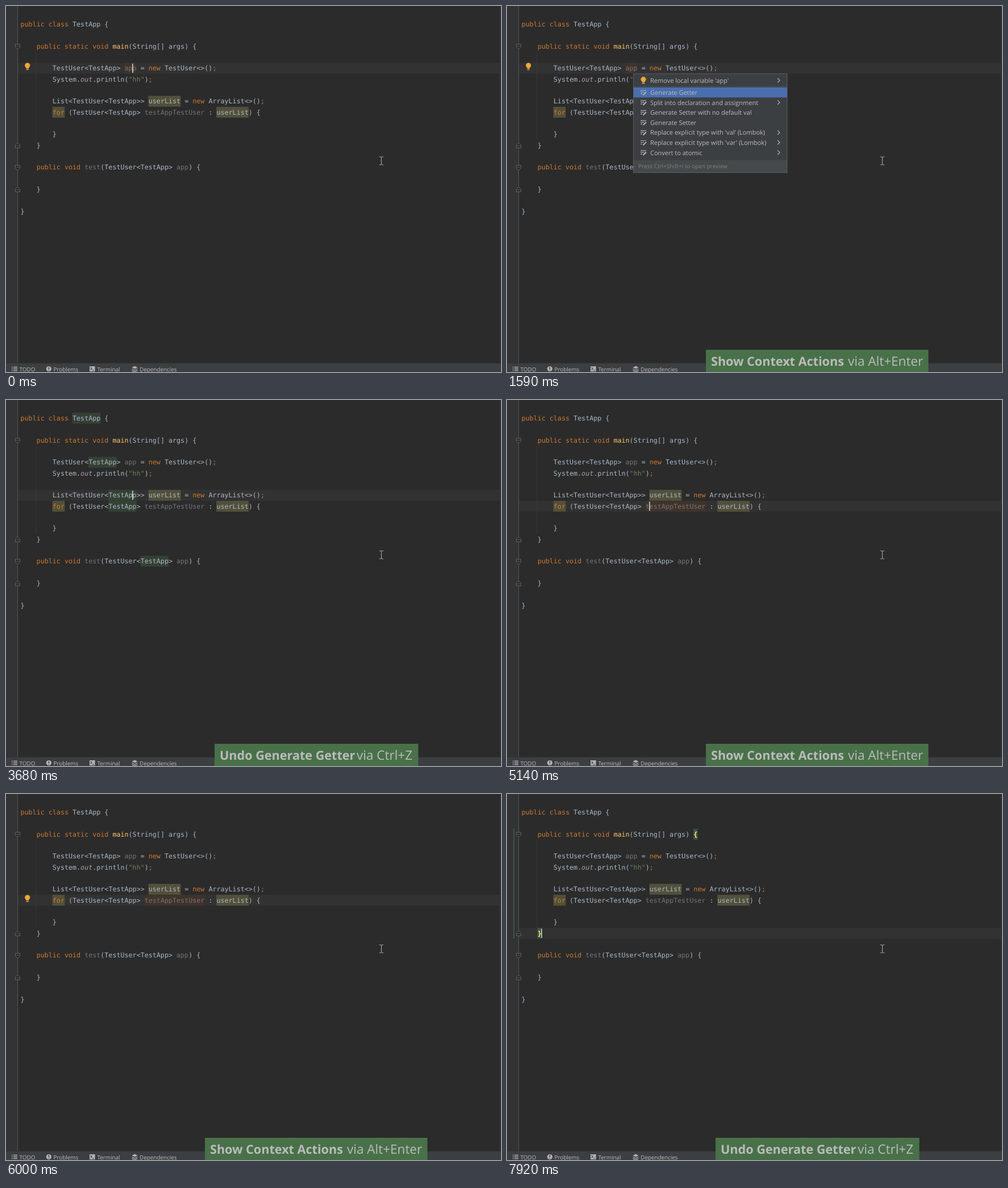
An HTML page for the animation above (8000 ms loop, 871x643 px).

```html
<!DOCTYPE html>
<html lang="en">
<head>
<meta charset="utf-8">
<title>Generate Getter</title>
<style>
html, body { margin: 0; width: 100%; height: 100%; overflow: hidden; background: #2b2b2b; }
svg { display: block; width: 871px; height: 643px; }
text { white-space: pre; text-rendering: geometricPrecision; font-family: "Open Sans", "Noto Sans", sans-serif; fill: #bbb; }
.code text { font: 11.7px "DejaVu Sans Mono", "Noto Sans Mono", monospace; font-variant-ligatures: none; fill: #a9b7c6; }
.code .kw { fill: #cc7832; }
.code .fn { fill: #ffc66d; }
.code .str { fill: #6a7f60; }
.code .it { font-style: italic; fill: #a99cae; }
.code .dim { fill: #72737a; }
.code .brace { fill: #ffef28; font-weight: 700; }
.fold { fill: #2b2b2b; stroke: #64676a; }
.menu text { font-size: 11px; }
.menu .hint { font-size: 10px; fill: #7d8083; }
.status text { font-size: 9.9px; }
.banner text { font-size: 22.5px; }
.banner .b { font-size: 21.6px; font-weight: 700; }
</style>
</head>
<body>
<svg viewBox="0 0 871 643">
  <rect width="871" height="643" fill="#2b2b2b"/>
  <g id="view"></g>
  <g class="status">
    <rect y="627" width="871" height="1" fill="#323232"/>
    <rect y="628" width="871" height="15" fill="#3c3f41"/>
    <path d="M10 634.5h1.5m1.5 0h7M10 637.5h1.5m1.5 0h7M10 640.5h1.5m1.5 0h7" stroke="#afb1b3" stroke-width="1.3"/>
    <circle cx="75.3" cy="637.5" r="4.6" fill="#afb1b3"/>
    <path d="M75.3 634.5v3.6m0 1.1v1.4" stroke="#3c3f41" stroke-width="1.4"/>
    <rect x="147" y="633" width="9.6" height="9" fill="#afb1b3"/>
    <path d="M148.8 635l2.2 2.2-2.2 2.2M152 640h3" fill="none" stroke="#3c3f41" stroke-width="1.2"/>
    <path d="M226.5 632.5l5 2.5-5 2.5-5-2.5z" fill="#afb1b3"/>
    <path d="M221.5 637.5l5 2.5 5-2.5M221.5 640.3l5 2.5 5-2.5" fill="none" stroke="#afb1b3" stroke-width="1.3"/>
    <text x="23.5" y="642">TODO</text>
    <text x="83.5" y="642">Problems</text>
    <text x="160.5" y="642">Terminal</text>
    <text x="235" y="642">Dependencies</text>
  </g>
  <g id="over"></g>
  <path d="M657 265h2.2l1.3 1 1.3-1h2.2M660.5 265.5v13M657 279h2.2l1.3-1 1.3 1h2.2" fill="none" stroke="#b4b4b4"/>
</svg>
<script>
const LOOP = 8000, CHAR = 7.04, LINE = 19.333, LEFT = 25.5;
const view = document.getElementById('view'), over = document.getElementById('over');

const source = [
  'public class TestApp {',
  '',
  '    public static void main(String[] args) {',
  '',
  '        TestUser<TestApp> app = new TestUser<>();',
  '        System.out.println("hh");',
  '',
  '        List<TestUser<TestApp>> userList = new ArrayList<>();',
  '        for (TestUser<TestApp> testAppTestUser : userList) {',
  '',
  '        }',
  '    }',
  '',
  '    public void `test`(TestUser<TestApp> `app`) {',
  '',
  '    }',
  '',
  '}'
];
const fields = ['int amount', 'Integer amount0', 'String name', 'Date now', 'TestApp data',
  'BigDecimal bigDecimal', 'List<TestApp> list', 'Map<String, TestApp> map'];

// time, line, column, visible
const caretSteps = [
  [0, 4, 28, 1], [200, 4, 28, 0], [730, 4, 28, 1], [1000, 4, 28, 0], [1930, 4, 28, 1],
  [3280, 5, 28, 1], [3540, 6, 0, 1], [3680, 7, 28, 1], [3810, 8, 28, 1], [4070, 8, 29, 1],
  [4210, 8, 30, 1], [4410, 8, 31, 1], [4540, 8, 32, 1], [5200, 8, 32, 0], [6070, 8, 32, 1],
  [7390, 9, 0, 1], [7920, 11, 5, 1]
];

const common = ['Generate Setter with no default val', 'Generate Setter',
  "Replace explicit type with 'val' (Lombok)>", "Replace explicit type with 'var' (Lombok)>"];
const menus = [
  { from: 1000, pick: 1590, to: 1860, x: 222, y: 118.5,
    items: ["Remove local variable 'app'>", 'Generate Getter', 'Split into declaration and assignment>', ...common, 'Convert to atomic>'] },
  { from: 5200, pick: 5670, to: 6000, x: 251, y: 196.5,
    items: ["Rename 'testAppTestUser' to 'ignored'>", 'Generate Getter', ...common] }
];

const esc = s => s.replace(/&/g, '&amp;').replace(/</g, '&lt;');
const within = (t, a, b) => t >= a && t < b;
const colX = c => LEFT + c * CHAR;
const midY = l => 32 + l * LINE;
const rect = (x, y, w, h, fill) => `<rect x="${x}" y="${y}" width="${w}" height="${h}" fill="${fill}"/>`;
const text = (x, y, s, cls = '') => `<text x="${x}" y="${y}" class="${cls}">${esc(s)}</text>`;
const plain = s => s.replace(/`/g, '');

function tokenClass(s) {
  if (s[0] === '`') return 'dim';
  if (s[0] === '"') return 'str';
  if (/^(public|class|static|void|new|for|int|;|,)$/.test(s)) return 'kw';
  return s === 'main' ? 'fn' : s === 'out' ? 'it' : '';
}

function codeLine(line, row) {
  let col = 0, out = '';
  for (const s of line.match(/`[^`]*`|"[^"]*"|\w+|[;,]|\s+|[^\w\s;,"`]+/g) || []) {
    const p = plain(s);
    if (p.trim()) out += text(colX(col), midY(row) + 4, p, tokenClass(s));
    col += p.length;
  }
  return out;
}

function getters(owner, indent, unused) {
  const q = unused ? '`' : '';
  return fields.map(f => {
    const cut = f.lastIndexOf(' '), name = f.slice(cut + 1);
    return `${indent}${f.slice(0, cut)} ${q}${name}${q} = ${owner}.get${name[0].toUpperCase()}${name.slice(1)}();`;
  }).concat('');
}

const bulb = (x, y) =>
  `<path d="M${x - 2.2} ${y + 5}v-1.5a4.6 4.6 0 1 1 4.4 0v1.5z" fill="#f0a732"/>` +
  rect(x - 2.2, y + 5.8, 4.4, 1.6, '#a7a9ab');

function fold(row, end) {
  const y = midY(row) + .5, d = end ? -1 : 1;
  return `<path class="fold" d="M16.5 ${y - 4 * d}h8v${5 * d}l-4 ${4 * d}l-4 ${-4 * d}zM18.5 ${y - .5 * d}h4"/>`;
}

function menu(m, t) {
  const h = 45 + 17.6 * (m.items.length - 1) + 6, sel = t >= m.pick ? 1 : 0;
  let out = rect(m.x + .5, m.y + .5, 270.5, h, '#3c3f41') + rect(m.x + 1, m.y + h - 22, 270, 22, '#46494b') +
    rect(m.x + 1, m.y + 22.5, 270, 1, '#4d5052');
  m.items.forEach((item, i) => {
    const y = m.y + (i ? 33.5 + (i - 1) * 17.6 : 12.5), x = m.x + 13;
    if (i === sel) out += rect(m.x + 1, y - 9, 270, 17.6, '#4b6eaf');
    out += i ? `<path d="M${x} ${y - 3.5}h10M${x} ${y - .5}h6M${x} ${y + 2.5}h3" stroke="#afb1b3" stroke-width="1.2"/>
      <path d="M${x + 4.5} ${y + 4.5}l5.5-5.5" stroke="#afb1b3" stroke-width="2.2"/>` : bulb(m.x + 18, y - 1.5);
    out += text(m.x + 30, y + 4, item.replace(/>$/, ''));
    if (item.endsWith('>')) out += `<path d="M${m.x + 254} ${y - 4}l4 3.8-4 3.8" fill="none" stroke="#afb1b3" stroke-width="1.2"/>`;
  });
  out += text(m.x + 9, m.y + h - 7.7, 'Press Ctrl+Shift+I to open preview', 'hint');
  return `<g class="menu">${out}<rect x="${m.x + .5}" y="${m.y + .5}" width="270.5" height="${h - .5}" fill="none" stroke="#5c5f61"/></g>`;
}

function banner(t) {
  if (t < 930) return '';
  const undo = within(t, 2950, 5140) || t >= 7060;
  const [x, w, label, viaX, via] = undo
    ? [367, 358.5, 'Undo Generate Getter', 617, 'via Ctrl+Z']
    : [350, 391.5, 'Show Context Actions', 600, 'via Alt+Enter'];
  return '<g class="banner">' + rect(x, 604, w, 39, '#497149') +
    text(x + 9, 632, label, 'b') + text(viaX, 632, via) + '</g>';
}

function editor(t) {
  const first = within(t, 1930, 2950), second = within(t, 6070, 7060);
  const shift = first || second ? fields.length + 1 : 0;
  const at = row => row + (first && row > 4 || second && row > 8 ? shift : 0);
  const lines = source.slice();
  if (!within(t, 2330, 3350)) lines[4] = lines[4].replace(' app ', ' `app` ');
  if (!within(t, 6400, 7720)) lines[8] = lines[8].replace('testAppTestUser', '`testAppTestUser`');
  if (first) lines.splice(5, 0, ...getters('app', ' '.repeat(8), t >= 2330));
  if (second) lines.splice(9, 0, ...getters('testAppTestUser', ' '.repeat(12), t >= 6400));

  const [, row, col, caretOn] = caretSteps.filter(s => s[0] <= t).pop();
  let under = '', top = '';
  const box = (r, c, n, fill) => { under += rect(colX(c) - .3, midY(r) - 9.5, n * CHAR + .6, 19, fill); };
  const mark = (r, word, fill) => {
    const c = plain(lines[r]).search(new RegExp(`\\b${word}\\b`));
    if (c >= 0) box(r, c, word.length, fill);
  };
  const brace = (r, c) => {
    box(r, c, 1, '#3b514d');
    top += text(colX(c), midY(r) + 4, plain(lines[r])[c], 'brace');
  };

  under += rect(0, 0, 20, 628, '#313335') + rect(20, 0, 1, 628, '#555555') + rect(869, 0, 1, 628, '#323537');
  under += rect(21, midY(row) - 9.5, 848, 19, '#323232');
  under += rect(52.5, midY(3) - 9.5, 1, (at(11) - 3) * LINE, '#393939');
  if (second) under += rect(81, midY(9) - 9.5, 1, (at(10) - 9) * LINE, '#393939');

  const warm = first ? '#523f35' : '#52503a';
  mark(at(7), 'userList', warm);
  mark(at(8), 'for', warm);
  mark(at(8), 'userList', warm);
  if (t < 3280) mark(4, 'app', '#40332b');
  if (first) for (let r = 5; r < 13; r++) mark(r, 'app', '#344134');
  if (within(t, 3680, 4210)) [0, 4, 7, 8, 13].forEach(r => mark(r, 'TestApp', '#344134'));
  if (within(t, 4540, 7390)) mark(8, 'testAppTestUser', '#40332b');
  if (second) for (let r = 9; r < 17; r++) mark(r, 'testAppTestUser', '#344134');
  if (within(t, 4070, 4410)) { brace(8, 21); brace(8, 29); }
  if (t >= 7920) {
    brace(2, 43);
    brace(11, 4);
    under += rect(11.5, 61, 1, 193, '#55776c');
  }

  top += fold(2) + fold(at(13)) + fold(at(11), true) + fold(at(15), true);
  if (within(t, 6470, 7720)) top += fold(8) + fold(at(10), true);
  if (t < 1930) top += bulb(37.7, 105);
  if (within(t, 5200, 6070)) top += bulb(37.7, 182.3);
  if (caretOn) top += rect(Math.floor(colX(col)), midY(row) - 8, 1.6, 16, '#d0d0d0');
  return `<g class="code">${under}${lines.map(codeLine).join('')}${top}</g>`;
}

const marks = [...new Set([0, 930, 1590, 1860, 2330, 2950, 3350, 4210, 5140, 5670, 6000, 6400, 6470, 7060, 7720,
  ...caretSteps.map(s => s[0])])].sort((a, b) => a - b);
let shown = -1;

function draw(now) {
  const t = now % LOOP, step = marks.filter(m => m <= t).pop();
  if (step !== shown) {
    shown = step;
    view.innerHTML = editor(step);
    over.innerHTML = menus.filter(m => within(step, m.from, m.to)).map(m => menu(m, step)).join('') + banner(step);
  }
}

const start = performance.now();
function frame() {
  draw(performance.now() - start);
  requestAnimationFrame(frame);
}
frame();
</script>
</body>
</html>
```
